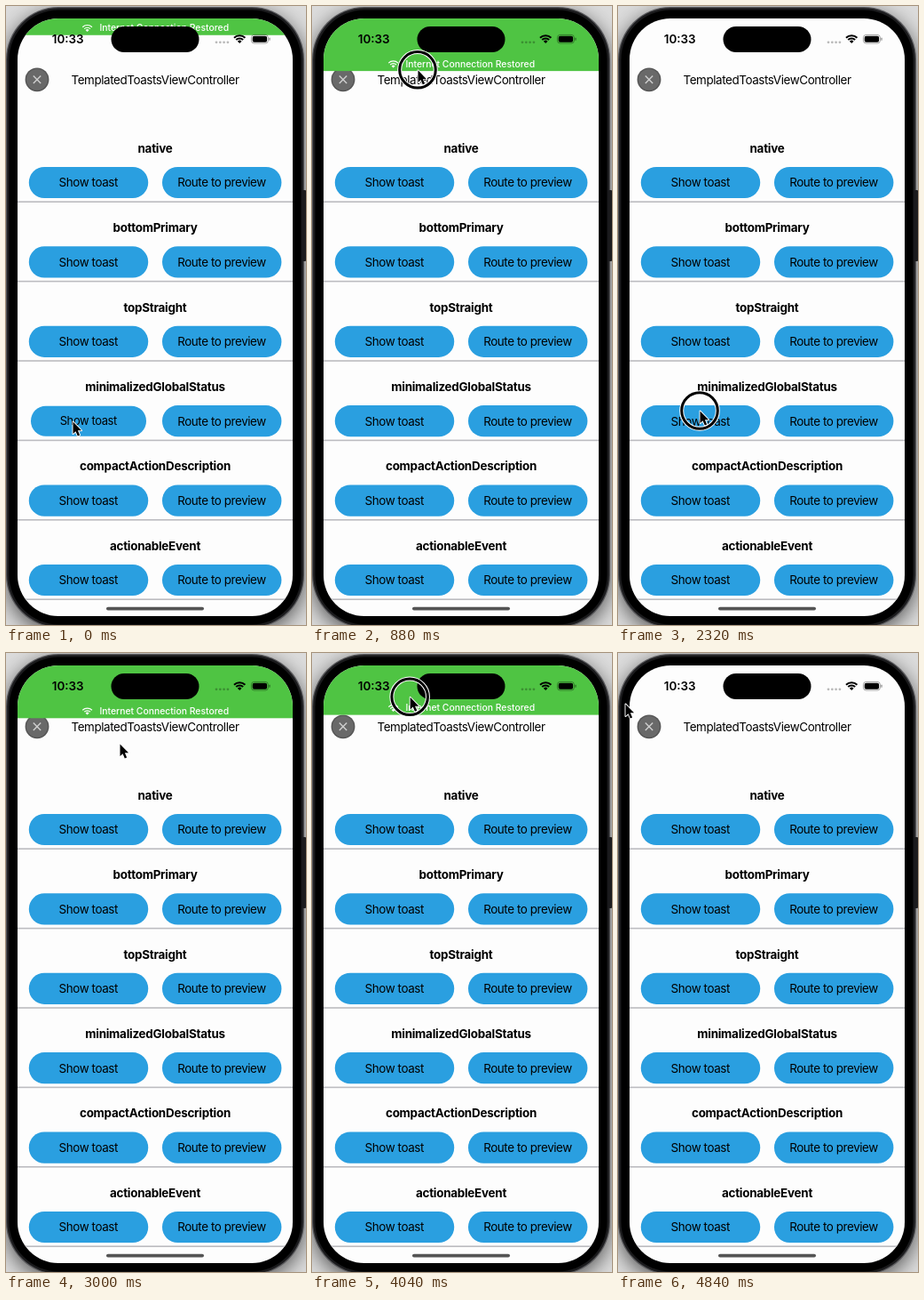
An HTML page with a canvas for the animation above (4.88 s loop, 338 by 696 pixels).

```html
<!DOCTYPE html>
<html lang="en">
<head>
<meta charset="utf-8">
<title>Toast preview</title>
<style>
  html, body { margin: 0; width: 100%; height: 100%; overflow: hidden; }
  canvas { display: block; width: 338px; height: 696px; }
</style>
</head>
<body>
<canvas id="stage" width="338" height="696"></canvas>
<script>
const ctx = document.getElementById('stage').getContext('2d');
const LOOP = 4880;
const BLUE = '#2a9fe0', GREEN = '#4fc443', WHITE = '#fdfdfd';
const ROWS = ['native', 'bottomPrimary', 'topStraight', 'minimalizedGlobalStatus',
  'compactActionDescription', 'actionableEvent'];
const PRESSED_ROW = 3;
const BANNER_HEIGHT = 59.3;

// Pointer stops: arrival time and place. Travel time follows from the distance.
const STOPS = [
  { at: 0, x: 75, y: 467 },
  { at: 780, x: 119, y: 72 },
  { at: 1150, x: 114, y: 37 },
  { at: 1560, x: 105, y: 186 },
  { at: 2200, x: 92, y: 455 },
  { at: 2980, x: 128, y: 102 },
  { at: 3880, x: 111, y: 53 },
  { at: 4240, x: 106, y: 31 },
  { at: 4840, x: 8, y: 57 }
];
// Each toast opens after a button press and is swiped away by a drag.
const TOASTS = [
  { open: -150, grab: 865, release: 1175 },
  { open: 2450, grab: 3970, release: 4500 }
];

const clamp = v => Math.min(1, Math.max(0, v));
const mix = (a, b, p) => a + (b - a) * p;
function ease(v) {
  const p = clamp(v);
  return p * p * (3 - 2 * p);
}

function pointerAt(t) {
  const next = STOPS.findIndex(stop => stop.at > t);
  if (next < 1) return STOPS[STOPS.length - 1];
  const a = STOPS[next - 1], b = STOPS[next];
  const travel = 250 + 0.9 * Math.hypot(b.x - a.x, b.y - a.y);
  const p = ease(1 - (b.at - t) / travel);
  return { x: mix(a.x, b.x, p), y: mix(a.y, b.y, p) };
}

function bannerOffset(t, { open, grab, release }) {
  const entering = -BANNER_HEIGHT * (1 - ease((t - open) / 400));
  if (t < grab) return entering;
  const dragged = Math.min(0, pointerAt(Math.min(t, release)).y - pointerAt(grab).y);
  return mix(dragged, -BANNER_HEIGHT, ease((t - release) / 200));
}

const pressScale = (t, { open }) => 1 - 0.05 * Math.sin(Math.PI * clamp((t - open + 120) / 350));

const isTouching = (t, { open, grab, release }) =>
  (t >= open - 180 && t < open) || (t >= grab - 20 && t < release);

function box(x, y, w, h, r, fill) {
  ctx.beginPath();
  ctx.roundRect(x, y, w, h, r);
  if (fill) {
    ctx.fillStyle = fill;
    ctx.fill();
  }
}

function disc(x, y, r, fill) {
  ctx.beginPath();
  ctx.arc(x, y, r, 0, Math.PI * 2);
  ctx.fillStyle = fill;
  ctx.fill();
}

function text(str, x, y, { weight = 400, size = 13.4, spacing = -0.4, color = '#000', align = 'center' } = {}) {
  ctx.font = `${weight} ${size}px Inter, sans-serif`;
  ctx.letterSpacing = spacing + 'px';
  ctx.textAlign = align;
  ctx.fillStyle = color;
  ctx.fillText(str, x, y);
}

function wifi(x, y, scale, width, color) {
  const from = -Math.PI * 0.75, to = -Math.PI * 0.25;
  ctx.save();
  ctx.translate(x, y);
  ctx.scale(scale, scale);
  ctx.fillStyle = ctx.strokeStyle = color;
  ctx.lineWidth = width;
  ctx.beginPath();
  ctx.moveTo(0, 0);
  ctx.arc(0, 0, 3.3, from, to);
  ctx.fill();
  for (const r of [5.6, 8.8]) {
    ctx.beginPath();
    ctx.arc(0, 0, r, from, to);
    ctx.stroke();
  }
  ctx.restore();
}

function phone() {
  ctx.fillStyle = '#dcdcdc';
  ctx.fillRect(0, 0, 338, 696);
  ctx.save();
  ctx.shadowColor = 'rgba(0,0,0,0.6)';
  ctx.shadowBlur = 22;
  ctx.shadowOffsetY = 6;
  box(0, 1, 336, 698, 59, '#58585b');
  ctx.restore();
  box(334, 207, 4, 80, 1, '#1c1c1e');
  box(1.2, 2.2, 333.6, 695.6, 58, '#1b1b1d');
  box(3.5, 4.5, 329, 691, 56, '#000');
}

function button(label, x, y, scale) {
  ctx.save();
  ctx.translate(x, y);
  ctx.scale(scale, scale);
  box(-67.2, -17.6, 134.4, 35.2, 17.4, BLUE);
  text(label, -0.2, 4.8);
  ctx.restore();
}

function list(scale) {
  ROWS.forEach((name, i) => {
    const y = 160 + i * 89.4;
    text(name, 168, y + 4.8, { weight: 700, spacing: -0.24 });
    button('Show toast', 93, y + 38.5, i === PRESSED_ROW ? scale : 1);
    button('Route to preview', 243.2, y + 38.5, 1);
    ctx.fillStyle = '#bcbcc0';
    ctx.fillRect(13, y + 59.4, 310, 1.6);
  });
}

function header() {
  const x = 35, y = 82.8, arm = 4.2;
  text('TemplatedToastsViewController', 168, 87.8);
  disc(x, y, 13.4, '#555');
  disc(x, y, 12, '#696969');
  ctx.strokeStyle = '#cfcfcf';
  ctx.lineWidth = 1.4;
  ctx.beginPath();
  for (const side of [-arm, arm]) {
    ctx.moveTo(x - arm, y - side);
    ctx.lineTo(x + arm, y + side);
  }
  ctx.stroke();
}

function banner(offset) {
  if (offset <= -BANNER_HEIGHT) return;
  ctx.fillStyle = GREEN;
  ctx.fillRect(13, 14 + offset, 310, BANNER_HEIGHT);
  wifi(91.6, 69.6 + offset, 0.86, 1.4, '#fff');
  text('Internet Connection Restored', 105.4, 69 + offset,
    { weight: 500, size: 10.4, spacing: 0, color: '#fff', align: 'left' });
}

function statusBar() {
  text('10:33', 69.7, 42, { weight: 600, spacing: 0 });
  box(118.5, 23, 99, 29, 14.5, '#000');
  for (let i = 0; i < 4; i++) disc(237 + i * 4.3, 40.8, 1.4, 'rgba(0,0,0,0.27)');
  wifi(263.2, 42, 1, 2, '#000');
  ctx.strokeStyle = 'rgba(0,0,0,0.4)';
  ctx.lineWidth = 0.9;
  box(276.4, 32.4, 19, 9.6, 3.2);
  ctx.stroke();
  box(277.7, 33.7, 16.4, 7, 2, '#000');
  box(296.4, 35.6, 1.2, 3.2, 0.6, 'rgba(0,0,0,0.45)');
}

function pointer({ x, y }, touching) {
  if (touching) {
    for (const [width, color] of [[5, '#fff'], [3, '#000']]) {
      ctx.beginPath();
      ctx.arc(x, y, 20.3, 0, Math.PI * 2);
      ctx.lineWidth = width;
      ctx.strokeStyle = color;
      ctx.stroke();
    }
  }
  const arrow = new Path2D('M0 0V14.6L3.3 11.6L5.7 17.2L8.2 16.1L5.8 10.6H10.3Z');
  ctx.save();
  ctx.translate(x + 0.5, y + 0.5);
  ctx.scale(0.93, 0.93);
  ctx.lineJoin = 'round';
  ctx.lineWidth = 2;
  ctx.strokeStyle = '#fff';
  ctx.stroke(arrow);
  ctx.fillStyle = '#000';
  ctx.fill(arrow);
  ctx.restore();
}

function draw(t) {
  phone();
  ctx.save();
  box(13, 14, 310, 672, 46, WHITE);
  ctx.clip();
  list(Math.min(...TOASTS.map(toast => pressScale(t, toast))));
  header();
  banner(Math.max(...TOASTS.map(toast => bannerOffset(t, toast))));
  statusBar();
  box(113, 675.7, 110, 3.8, 1.9, '#545454');
  ctx.restore();
  pointer(pointerAt(t), TOASTS.some(toast => isTouching(t, toast)));
}

let start;
function tick(now) {
  start ??= now;
  draw((now - start) % LOOP);
  requestAnimationFrame(tick);
}
requestAnimationFrame(tick);
</script>
</body>
</html>
```
